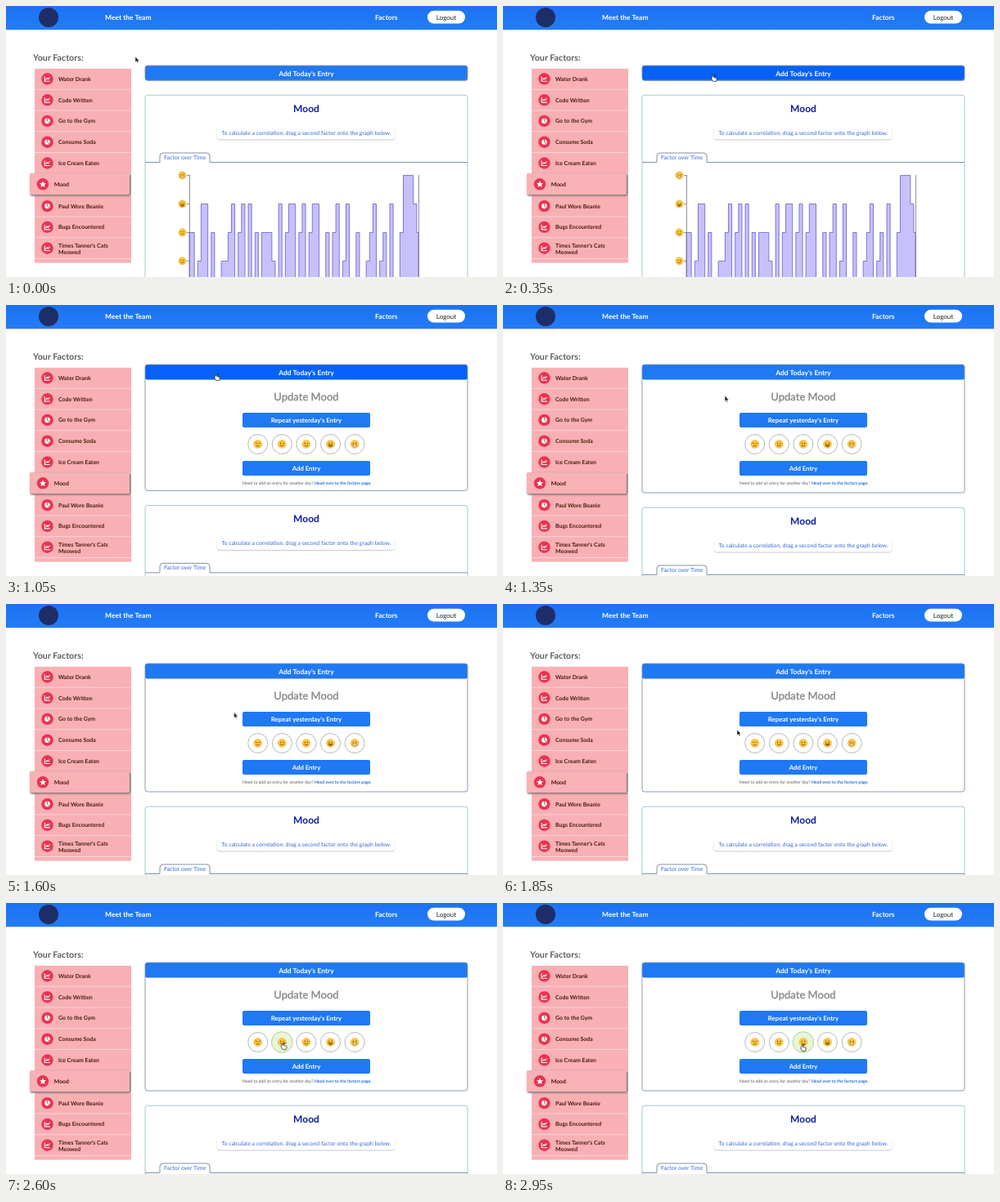
Animation, 600 px wide and 332 px high, one loop 3000 ms. Source, as an HTML page:

```html
<!DOCTYPE html>
<html lang="en">
<head>
<meta charset="utf-8">
<title>Factor dashboard</title>
<style>
  html, body { margin: 0; width: 100%; height: 100%; overflow: hidden; background: #fff; }
  svg { display: block; width: 600px; height: 332px; }
  text { font-family: Lato, "Open Sans", sans-serif; text-rendering: geometricPrecision; }
  .b { font-weight: 700; }
  .mid { text-anchor: middle; }
  .white { fill: #fff; }
  .blue { fill: #1f78f4; }
  .link { fill: #3468d6; font-size: 7px; }
  .label { fill: #4c1a0c; font-size: 6.95px; }
  .line { fill: none; stroke: #fff; stroke-width: 1.1; stroke-linejoin: round; }
  .selected { filter: drop-shadow(1px 1px .8px #4a4446); }
  .hint { filter: drop-shadow(0 1px .6px #c3cad6); }
  .bar { filter: drop-shadow(0 .6px .8px #a9adb5); }

  .below, .outline, .toggle, .cursor { animation: 3s linear infinite; }
  .below { animation-name: slide; }
  .outline { animation-name: grow; }
  .toggle { animation-name: press; }
  .cursor { animation-name: move; }
  .arrow, .hand, .glow { animation: 3s step-end infinite; }
  .arrow { animation-name: arrow; }
  .hand { animation-name: hand; }
  .glow { opacity: 0; }

  @keyframes slide {
    0%, 27.3% { transform: none; animation-timing-function: ease; }
    36.7%, 100% { transform: translateY(139px); }
  }
  @keyframes grow {
    0%, 27.3% { height: 18px; animation-timing-function: ease; }
    36.7%, 100% { height: 157px; }
  }
  @keyframes press {
    0%, 5% { fill: #1f78f4; }
    8%, 37.3% { fill: #0561f7; }
    40%, 100% { fill: #1f78f4; }
  }
  @keyframes move {
    0%, 1.7% { transform: translate(158px, 62px); }
    10.5%, 35% { transform: translate(257px, 85px); }
    45% { transform: translate(271px, 111px); }
    61.7% { transform: translate(286px, 154px); }
    75% { transform: translate(312px, 170px); }
    86% { transform: translate(337px, 172px); }
    98.3%, 100% { transform: translate(366px, 174px); }
  }
  @keyframes arrow {
    0%, 37.3%, 78.1%, 91.1% { opacity: 1; }
    5.5%, 67%, 80.7%, 93.7%, 100% { opacity: 0; }
  }
  @keyframes hand {
    0%, 37.3%, 78.1%, 91.1% { opacity: 0; }
    5.5%, 67%, 80.7%, 93.7%, 100% { opacity: 1; }
  }
  @keyframes glow0 { 0%, 78.1% { opacity: 0; } 67% { opacity: 1; } }
  @keyframes glow1 { 0%, 91.1% { opacity: 0; } 80.7% { opacity: 1; } }
  @keyframes glow2 { 0% { opacity: 0; } 93.7%, 100% { opacity: 1; } }
</style>
</head>
<body>
<svg viewBox="0 0 600 332">
  <defs>
    <linearGradient id="sky" x2="0" y2="1">
      <stop stop-color="#1c72f2"/><stop offset="1" stop-color="#237cf6"/>
    </linearGradient>
    <clipPath id="list"><rect x="20" y="70" width="140" height="244.5"/></clipPath>
    <g id="trend" class="line">
      <path d="M-3.3-3V3H3.4"/><path d="M-2 1.2-.4-1 .9.4 3-2"/>
    </g>
    <g id="pie">
      <circle r="3.3" class="white"/>
      <path d="M0-3.4V0L2.6 2.4" fill="none" stroke="#e93350" stroke-width=".9"/>
    </g>
    <path id="star" class="white" d="M0-4 1.2-1.3 4-1.1 1.9.8 2.5 3.6 0 2.1-2.5 3.6-1.9.8-4-1.1-1.2-1.3Z"/>
  </defs>
  <rect width="600" height="332" fill="#fff"/>

  <rect class="bar" width="600" height="29" fill="url(#sky)"/>
  <circle cx="52" cy="14" r="12" fill="#1d2d68"/>
  <g class="b white" font-size="8.5">
    <text x="121" y="17">Meet the Team</text>
    <text x="451" y="17">Factors</text>
  </g>
  <rect x="515" y="5.7" width="46" height="15.8" rx="7.9" fill="#fff"/>
  <text class="mid" x="538" y="16.7" font-size="8" fill="#222">Logout</text>

  <text class="b" x="33" y="66.5" font-size="10.7" fill="#5d5f63">Your Factors:</text>
  <g id="rows" clip-path="url(#list)"></g>

  <rect class="toggle" x="170" y="73" width="394" height="18.5" rx="2.5"/>
  <text class="b mid white" x="367" y="85.8" font-size="8.5">Add Today's Entry</text>

  <g id="form">
    <text class="mid" x="367" y="117" font-size="13" font-weight="500" fill="#858688"
      stroke="#858688" stroke-width=".25">Update Mood</text>
    <rect class="blue" x="289" y="132" width="156" height="18" rx="2"/>
    <text class="b mid white" x="367" y="144" font-size="7.9">Repeat yesterday's Entry</text>
    <g id="moods"></g>
    <rect class="blue" x="289" y="191" width="156" height="18" rx="2"/>
    <text class="b mid white" x="367" y="203" font-size="7.8">Add Entry</text>
    <text x="289" y="220" font-size="5.2" fill="#55585e">Need to add an entry for another day?
      <tspan class="b" fill="#1f6be8">Head over to the factors page.</tspan></text>
  </g>

  <g class="below">
    <rect x="165" y="92" width="405" height="300" fill="#fff"/>
    <rect x="170" y="109.2" width="394" height="300" rx="3" fill="#fff" stroke="#a6c9d0"/>
    <text class="b mid" x="367" y="129.6" font-size="12" fill="#0d1d9c">Mood</text>
    <rect class="hint" x="257.5" y="147" width="218" height="16.5" rx="4" fill="#fff"/>
    <text class="link mid" x="367" y="158" style="font-size:6.87px">To calculate a correlation, drag a second factor onto the graph below.</text>
    <path d="M170 191.5H188V184Q188 180 192 180H245Q249 180 249 184V191.5H564"
      fill="none" stroke="#73869a" stroke-width=".9"/>
    <text class="link" x="193" y="188">Factor over Time</text>
    <path id="steps" fill="#c7c1fb" stroke="#7469d4" stroke-width=".9"/>
    <path d="M224.5 207V400M504.5 207V400" stroke="#777" stroke-width=".8" fill="none"/>
    <g id="axis"></g>
  </g>
  <rect class="outline" x="170" y="73" width="394" height="18" rx="3" fill="none" stroke="#7f90a8" stroke-width=".9"/>

  <g class="cursor">
    <path class="arrow" d="M0 0V7L1.6 5.6 2.6 7.9 3.7 7.4 2.7 5.2H4.9Z"
      fill="#111" stroke="#fff" stroke-width=".5"/>
    <path class="hand" d="M-.8 0Q0-1 .7 0V2.6Q1.6 2.1 2 2.9 2.9 2.5 3.2 3.3 4.2 3.1 4.2 4V5.6L3.5 7.4H-.3L-2.2 4.5Q-2-.2 3.5-.8 4.2Z"
      fill="#fff" stroke="#222" stroke-width=".8" stroke-linejoin="round"/>
  </g>
</svg>
<script>
  const fill = (id, html) => { document.getElementById(id).innerHTML = html; };

  const factors = [
    ["trend", "Water Drank"], ["trend", "Code Written"], ["pie", "Go to the Gym"],
    ["pie", "Consume Soda"], ["trend", "Ice Cream Eaten"], ["star", "Mood"],
    ["pie", "Paul Wore Beanie"], ["trend", "Bugs Encountered"],
    ["trend", "Times Tanner's Cats", "Meowed"], ["", ""]
  ];
  const chosen = 5;

  // The raised row is 1px taller and pushes later rows down
  function row([icon, first, second], i) {
    const picked = i === chosen;
    const y = 89.3 + 25.8 * i + (i > chosen ? 1 : 0);
    const x = picked ? 45 : 50.5;
    const tx = picked ? 58.7 : 64;
    const box = picked
      ? `<rect class="selected" x="29" y="${y - 13}" width="122" height="26" rx="1" fill="#f8b1b5"/>`
      : `<rect x="35" y="${y - 12.5}" width="118" height="25" fill="#f8b0b4"/>`;
    if (!icon) return box;
    const line = (s, ty) => `<text class="label b" x="${tx}" y="${ty}">${s}</text>`;
    return box + `<circle cx="${x}" cy="${y}" r="7.2" fill="#e93350"/>
      <use href="#${icon}" x="${x}" y="${y}"/>` +
      (second ? line(first, y - .6) + line(second, y + 7.4) : line(first, y + 2.5));
  }

  // Paint the raised row last, above its neighbours
  const rows = factors.map(row);
  rows.push(...rows.splice(chosen, 1));
  fill("rows", `<rect x="35" y="77" width="118" height="238" fill="#fcdcdd"/>` + rows.join(""));

  // mood runs from 0 (sad) to 4 (beaming)
  function face(x, y, mood, r = 4.7) {
    const ink = "#7a4a16";
    const eyes = mood === 0
      ? `<path d="M-2.8-1.5-.8-.6M2.8-1.5.8-.6" stroke="${ink}" stroke-width=".8"/>`
      : `<ellipse cx="-1.6" cy="-1" rx=".6" ry=".8" fill="${ink}"/><ellipse cx="1.6" cy="-1" rx=".6" ry=".8" fill="${ink}"/>`;
    const mouth = mood === 0
      ? `<path d="M-1.8 2.5Q0 .8 1.8 2.5" fill="none" stroke="${ink}" stroke-width=".8"/>`
      : mood < 3
        ? `<path d="M-2.2 1.2Q0 ${2.4 + mood * .6} 2.2 1.2" fill="none" stroke="${ink}" stroke-width=".8"/>`
        : `<path d="M-2.5.8H2.5Q1.8 3 0 3T-2.5.8Z" fill="${mood === 4 ? "#fff" : "#a0642a"}" stroke="${ink}" stroke-width=".5"/>`;
    return `<g transform="translate(${x} ${y}) scale(${r / 4.7})">
      <circle r="4.7" fill="#fcc63c" stroke="#e9a62c" stroke-width=".4"/>${eyes}${mouth}</g>`;
  }

  fill("moods", [0, 1, 2, 3, 4].map(i => {
    const x = 307.7 + 29.6 * i;
    const glow = i < 3
      ? `<circle class="glow" style="animation-name:glow${i}" cx="${x}" cy="170.5" r="12.8" fill="#e7f6d6" stroke="#a9bd98" stroke-width=".8"/>`
      : "";
    return `<circle cx="${x}" cy="170.5" r="12" fill="#fff" stroke="#a3a5a8" stroke-width=".8"/>` +
      glow + face(x, 170.5, i, 5);
  }).join(""));

  const level = n => 207.5 + 35 * n;
  fill("axis", [4, 3, 2, 1].map((mood, n) =>
    `<path d="M221 ${level(n)}H224.5" stroke="#777" stroke-width=".8"/>` +
    face(215.5, level(n), mood)).join(""));

  // Each digit is one day, 0 being the best mood; steps change midway between days
  const days = "2243114244" + "3321421414" + "2422234142" + "1142142114" +
    "4242143144" + "2443214324" + "144200012";
  const last = days.length - 1;
  const edge = i => 224 + 280 * Math.min(i + .5, last) / last;
  const path = [...days].map((d, i) => `V${level(+d)}H${edge(i)}`).join("");
  document.getElementById("steps").setAttribute("d", `M224 400${path}V400Z`);
</script>
</body>
</html>
```
